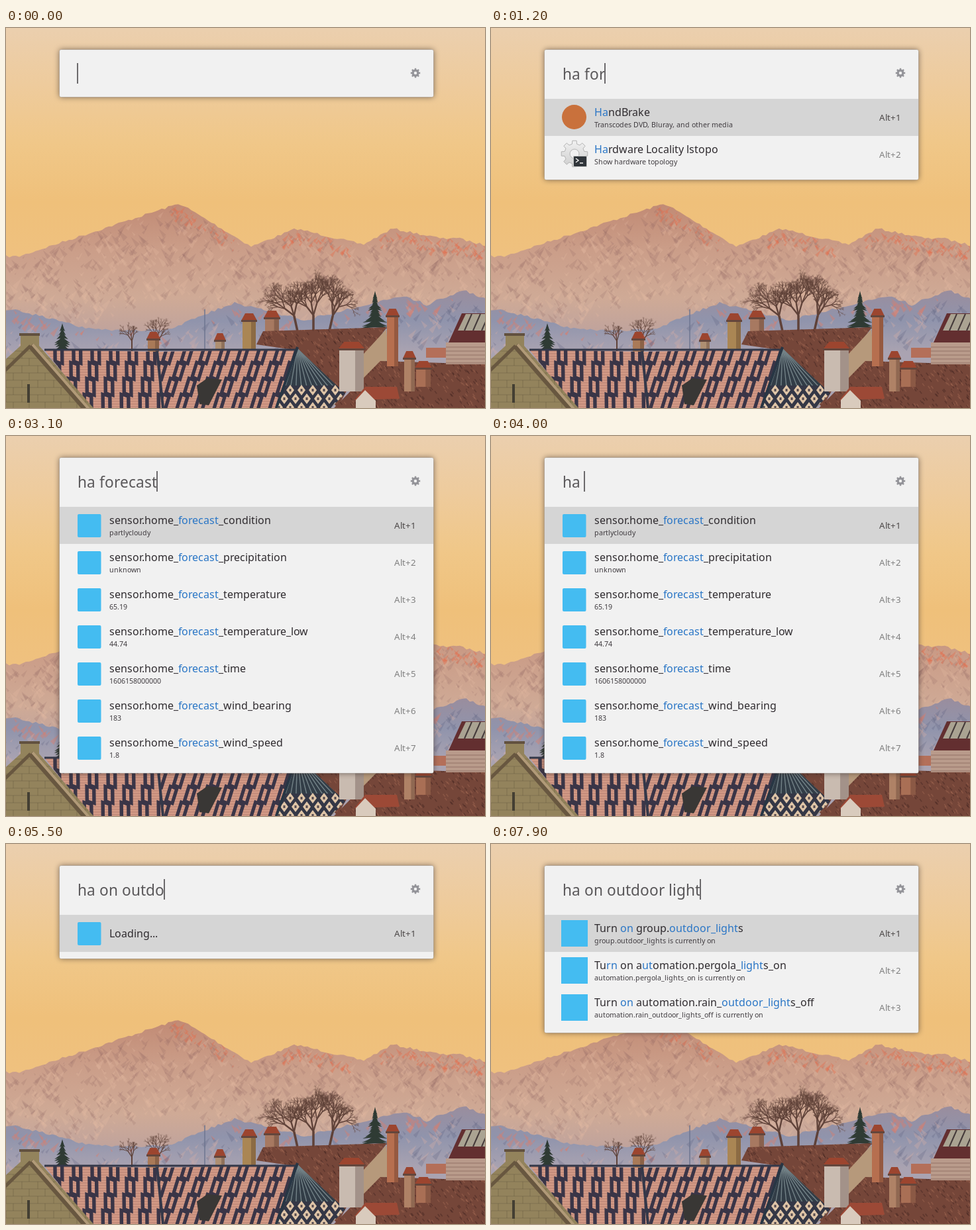
An HTML page with a canvas that plays this animation: 723x574 px, repeating every 8000 ms.

```html
<!DOCTYPE html>
<html lang="en">
<head>
<meta charset="utf-8">
<title>Launcher search</title>
<style>
html, body { margin: 0; width: 100%; height: 100%; overflow: hidden; background: #efc88f; }
canvas { display: block; width: 723px; height: 574px; }
</style>
</head>
<body>
<canvas id="stage" width="723" height="574"></canvas>
<script>
const W = 723, H = 574, LOOP = 8000;
const stage = document.getElementById('stage').getContext('2d', { alpha: false });

let seed = 7;
const rnd = () => (seed = (seed * 16807) % 2147483647) / 2147483647;
const between = (a, b) => a + (b - a) * rnd();

function gradient(c, y0, y1, ...colors) {
  const g = c.createLinearGradient(0, y0, 0, y1);
  colors.forEach((col, i) => g.addColorStop(i / (colors.length - 1), col));
  return g;
}

function poly(c, points, fill) {
  const path = new Path2D('M' + points + 'Z');
  c.fillStyle = fill;
  c.fill(path);
  return path;
}

function line(c, x0, y0, x1, y1, color, width = 1) {
  c.strokeStyle = color;
  c.lineWidth = width;
  c.beginPath();
  c.moveTo(x0, y0);
  c.lineTo(x1, y1);
  c.stroke();
}

function box(c, x, y, w, h, fill, r = 0) {
  c.fillStyle = fill;
  c.beginPath();
  c.roundRect(x, y, w, h, r);
  c.fill();
}

function inside(c, path, draw) {
  c.save();
  c.clip(path);
  draw();
  c.restore();
}

// ---- landscape ----

// Each peak: x, y, slope to the left, slope to the right
const ALPS = [[262, 265, .33, .6], [438, 303, .4, .24], [583, 303, .55, .2], [675, 316, .2, .25]];
const HILLS = [[10, 425, .3, .25], [345, 415, .4, .25], [600, 404, .25, .4], [690, 396, .4, .4]];

const skyline = (peaks, floor) => x => Math.min(floor,
  ...peaks.map(([px, py, left, right]) => py + (x < px ? (px - x) * left : (x - px) * right)));

function range(c, top, rough, fill) {
  let points = `0,${H}`;
  for (let x = 0; x < W + 5; x += 5) points += ` ${x},${top(x) + between(-rough, rough)}`;
  return poly(c, `${points} ${W},${H}`, fill);
}

function facet(c, x, y, size, color) {
  const dx = size * (rnd() < .5 ? -1 : 1);
  poly(c, `${x},${y} ${x + dx},${y + size * .8} ${x + dx * .6},${y + size * 1.2}`, color);
}

function mountains(c) {
  const top = skyline(ALPS, 345);
  const path = range(c, top, 1.8, gradient(c, 265, 480, '#c18a74', '#cb9e89', '#cfaa96', '#b9a09f'));
  inside(c, path, () => {
    for (let i = 0; i < 1300; i++) {
      const x = between(-10, W), depth = between(0, 130);
      const dark = rnd() < .72 - depth / 300;
      facet(c, x, top(x) + depth, between(2, 15), dark ? 'rgba(132,88,88,.17)' : 'rgba(228,186,162,.24)');
    }
    for (const [px] of ALPS)
      for (let i = 0; i < 45; i++) {
        const x = px + between(-15, 85);
        facet(c, x, top(x) + between(0, 20), between(2, 10), 'rgba(228,108,76,.4)');
      }
  });
}

function hills(c) {
  const top = skyline(HILLS, 456);
  const path = range(c, top, 2, gradient(c, 395, 490, '#9a8d9d', '#9094ac', '#aaa3b1'));
  inside(c, path, () => {
    for (let i = 0; i < 260; i++) {
      const x = between(0, W), depth = between(0, 60);
      const color = depth < 12 ? 'rgba(222,122,104,.4)'
        : rnd() < .5 ? 'rgba(88,93,124,.25)' : 'rgba(207,171,166,.36)';
      facet(c, x, top(x) + depth, between(4, 15), color);
    }
  });
}

function branch(c, x, y, angle, len, width) {
  const x1 = x + Math.cos(angle) * len, y1 = y + Math.sin(angle) * len;
  line(c, x, y, x1, y1, '#5f4239', width);
  if (len < 4) return;
  for (const turn of [-.5, 0, .5])
    branch(c, x1, y1, angle + turn + between(-.25, .25), len * between(.55, .82), width * .68);
}

function conifer(c, x, top, bottom, half) {
  for (let y = top; y < bottom; y += 3) {
    const w = half * (.15 + .85 * (y - top) / (bottom - top)) * between(.55, 1.15);
    poly(c, `${x},${y - 4} ${x + w},${y + 5} ${x},${y + 3} ${x - w},${y + 5}`, '#2f3b34');
  }
}

function chimney(c, x, y, w, bottom, wall) {
  box(c, x, y, w, bottom - y, wall);
  box(c, x + w * .65, y, w * .35, bottom - y, 'rgba(50,25,20,.25)');
  poly(c, `${x - 2},${y} ${x + w * .2},${y - 11} ${x + w * .8},${y - 11} ${x + w + 2},${y}`, '#9c452f');
  box(c, x - 2, y - 1, w + 4, 3, '#64463c');
}

// Columns of dark lozenges on pale tile courses
function tiles(c, points, skew) {
  inside(c, poly(c, points, '#d39a86'), () => {
    c.transform(1, 0, skew, 1, -skew * 486, 0);
    for (let y = 488; y < H; y += 4) line(c, -60, y, 500, y, 'rgba(110,62,62,.3)');
    c.strokeStyle = '#3a3547';
    c.lineWidth = 5;
    for (let row = 0; row < 5; row++)
      for (let x = 20; x < 460; x += 28) {
        const k = x + (row % 2) * 14, y = 494 + row * 24;
        c.stroke(new Path2D(`M${k - 9},${y + 9}L${k},${y - 13}L${k + 9},${y - 9}L${k},${y + 13}Z`));
      }
  });
}

function brownRoof(c, points) {
  const path = poly(c, points, '#754639');
  inside(c, path, () => {
    for (let i = 0; i < 900; i++) {
      const x = between(370, W), y = between(450, H);
      line(c, x, y, x + 3, y + 4, rnd() < .5 ? 'rgba(45,24,24,.32)' : 'rgba(184,122,98,.3)', 1.5);
    }
  });
}

function tent(c) {
  inside(c, poly(c, '440,484 408,574 490,574 512,552', '#323d47'), () => {
    for (let i = 0; i < 12; i++) line(c, 440, 484, 404 + i * 11, 562, '#738287', 1.4);
    box(c, 400, 540, 120, 40, '#343746');
    for (let row = 0; row < 3; row++)
      for (let x = 412; x < 510; x += 17) {
        const k = x + (row % 2) * 8, y = 547 + row * 13;
        poly(c, `${k},${y - 8} ${k + 6},${y} ${k},${y + 8} ${k - 6},${y}`, '#dfc5a7');
        box(c, k - 1.5, y - 2, 3, 4, '#554b50');
      }
  });
}

function gable(c) {
  inside(c, poly(c, '0,500 22,480 22,463 50,463 50,480 132,574 0,574', '#93835c'), () => {
    for (let y = 488; y < H; y += 11) {
      line(c, 0, y, 130, y, 'rgba(67,57,42,.25)');
      for (let x = (y % 2) * 11; x < 130; x += 24) line(c, x, y, x, y + 11, 'rgba(67,57,42,.25)');
    }
    line(c, 37, 480, 126, 582, '#685740', 9);
    line(c, 40, 478, 129, 580, '#b19a78', 4);
    line(c, 37, 480, -4, 520, '#685740', 5);
  });
  box(c, 20, 461, 31, 4, '#62513f');
  box(c, 32, 538, 4, 28, '#443f33');
}

function glasshouse(c) {
  box(c, 664, 475, 59, 33, '#b99b8b');
  for (let y = 482; y < 508; y += 6) line(c, 664, y, W, y, '#937266');
  poly(c, '668,475 688,431 723,431 723,475', '#632f30');
  poly(c, '682,457 694,432 723,432 723,457', '#aaa392');
  for (let x = 692; x < 735; x += 13) line(c, x, 457, x + 11, 432, '#443a3a', 2);
}

function town(c) {
  for (const x of [440, 464, 488]) branch(c, x, 458, -1.57 + (x - 464) / 110, 24, 3.5);
  for (const x of [190, 228]) branch(c, x, 488, -1.57, 15, 2);
  conifer(c, 557, 401, 452, 21);
  conifer(c, 85, 450, 488, 18);
  line(c, 300, 425, 300, 488, '#6e7690', 1.5);

  chimney(c, 391, 438, 21, 470, '#a77961');
  brownRoof(c, '388,458 575,452 545,492 500,574 440,487 378,478');
  chimney(c, 357, 442, 20, 486, '#aa8654');
  chimney(c, 316, 472, 14, 488, '#ae8f72');
  chimney(c, 214, 470, 17, 490, '#a97a58');
  poly(c, '540,492 574,455 578,500 535,535', '#b6997b');

  tiles(c, '58,486 227,489 236,574 128,574', .42);
  tiles(c, '229,489 440,485 408,574 238,574', .1);
  line(c, 58, 486, 440, 486, '#343849', 3);
  line(c, 228, 488, 237, H, '#343849', 4);
  poly(c, '288,540 304,529 326,531 306,570 292,568', '#393735');
  tent(c);
  line(c, 440, 482, 408, H, '#283644', 4);

  brownRoof(c, '495,574 565,503 723,508 723,574');
  chimney(c, 503, 485, 37, 549, '#c9bbb0');
  chimney(c, 575, 435, 17, 511, '#b66f4f');
  chimney(c, 601, 499, 16, 549, '#af8266');
  chimney(c, 619, 514, 22, 542, '#a96f55');
  poly(c, '526,562 542,542 590,542 594,560', '#9c4936');
  poly(c, '528,574 528,562 542,547 558,563 558,574', '#d9cbbd');
  box(c, 634, 483, 30, 15, '#b46f59');
  glasshouse(c);
  gable(c);
}

function landscape() {
  const canvas = document.createElement('canvas');
  canvas.width = W;
  canvas.height = H;
  const c = canvas.getContext('2d');
  c.fillStyle = gradient(c, 0, 350, '#ebcfae', '#eecb9c', '#f0c788', '#efc07a', '#efc17f');
  c.fillRect(0, 0, W, H);
  mountains(c);
  hills(c);
  town(c);
  return canvas;
}

// ---- launcher ----

const BLUE = '#2a76c6', SKY = '#44bcf1';

// Whole-pixel advances with kerning; asterisks toggle the highlight
function type(text, x, y, size, color) {
  const c = stage;
  c.font = `${size}px "Noto Sans", sans-serif`;
  const width = s => c.measureText(s).width;
  const chars = [...text.replaceAll('*', '')];
  let lit = false, i = 0;
  for (const ch of text) {
    if (ch === '*') { lit = !lit; continue; }
    c.fillStyle = lit ? BLUE : color;
    c.fillText(ch, x, y);
    const next = chars[++i] || '';
    x += Math.round(width(ch + next) - width(next) - .01);
  }
  return x;
}

function gear(x, y, r, hole, fill) {
  const path = new Path2D(), n = 8, step = Math.PI * 2 / n;
  for (let i = 0; i < n; i++)
    for (const [a, k] of [[-.3, .76], [-.2, 1], [.2, 1], [.3, .76]])
      path.lineTo(x + Math.cos((i + a) * step) * r * k, y + Math.sin((i + a) * step) * r * k);
  path.closePath();
  path.moveTo(x + hole, y);
  path.arc(x, y, hole, 0, 7);
  stage.fillStyle = fill;
  stage.fill(path, 'evenodd');
  return path;
}

const icons = {
  disc: y => box(stage, 107, y + 9, 37, 37, '#c9713c', 19),
  program(y) {
    const edge = gear(126, y + 27, 20, 7, gradient(stage, y + 8, y + 46, '#f0f0f0', '#cfcfcf'));
    stage.strokeStyle = '#b4b4b4';
    stage.lineWidth = 1;
    stage.stroke(edge);
    box(stage, 124, y + 30, 21, 17, '#c4c6c6', 1);
    box(stage, 125, y + 31, 19, 15, '#30353a', 1);
    stage.strokeStyle = '#f2f2f2';
    stage.lineWidth = 1.5;
    stage.stroke(new Path2D(`M128,${y + 34}l4,3l-4,3M134,${y + 41}h5`));
  },
  small: y => box(stage, 108, y + 11, 35.5, 35, SKY, 2),
  large: y => box(stage, 106, y + 8, 40, 40, SKY)
};

const apps = [
  ['disc', '*Ha*ndBrake', 'Transcodes DVD, Bluray, and other media'],
  ['program', '*Ha*rdware Locality lstopo', 'Show hardware topology']
];
const loading = [['small', 'Loading...']];
const forecast = Object.entries({
  condition: 'partlycloudy', precipitation: 'unknown', temperature: '65.19', temperature_low: '44.74',
  time: '1606158000000', wind_bearing: '183', wind_speed: '1.8'
}).map(([key, value]) => ['small', 'sensor.home_*forecast*_' + key, value]);
const lights = [
  'Turn *on* group.*outdoor_light*s',
  'Tu*rn* on a*ut*omation.pergola_*light*s_on',
  'Turn *on* automation.rain_*outdoor_light*s_off'
].map(title => ['large', title, title.replaceAll('*', '').slice(8) + ' is currently on']);

const scenes = [[0, []], [600, apps], [2300, loading], [3100, forecast], [4300, loading], [7000, lights]];
const CLEARED = 4000, KEY = 100;

// Bursts of typing, one key every KEY ms
const firstTry = [[600, 'ha f'], [1100, 'or'], [1400, 'e'], [1600, 'cas'], [2000, 't']];
const secondTry = [[CLEARED - 3 * KEY, 'ha '], [4600, 'on '], [5000, 'ou'], [5300, 't'], [5500, 'd'],
  [5500, 'o'], [5700, 'or l'], [6200, 'ight']];
const blinks = [[3300, 3700], [7700, 7900]];

const queryAt = t => (t < CLEARED ? firstTry : secondTry)
  .map(([from, keys]) => keys.slice(0, Math.max(0, Math.floor((t - from) / KEY) + 1))).join('');
const rowsAt = t => scenes.findLast(([from]) => from <= t)[1];
const caretOn = t => !blinks.some(([off, on]) => t >= off && t < on);

function panel(height) {
  stage.save();
  stage.shadowColor = 'rgba(50,40,35,.6)';
  stage.shadowBlur = 8;
  box(stage, 80.5, 32.5, 565, height + 1, '#b3b0ad', 3);
  stage.restore();
  box(stage, 81, 33, 564, height, '#f1f1f1', 2);
}

function row([icon, title, note], i) {
  const y = 107 + i * 56;
  if (!i) box(stage, 81, y, 564, 56, '#d5d5d5');
  icons[icon](y);
  type(title, 156, y + (note ? 26 : 34), 16, '#302c30');
  if (note) type(note, 156, y + 43, 32 / 3, '#403c40');
  type('Alt+' + (i + 1), 586, y + 33, 40 / 3, i ? '#808080' : '#4c4848');
}

const backdrop = landscape();

function draw(t) {
  const rows = rowsAt(t);
  stage.drawImage(backdrop, 0, 0);
  panel(rows.length ? 84 + rows.length * 56 : 71);
  gear(618, 68, 7.3, 2.3, '#949499');
  const end = type(queryAt(t), 108, 78, 68 / 3, '#5a585a');
  if (caretOn(t)) box(stage, end - 1, 53, 2, 31, '#6c6a6c');
  rows.forEach(row);
}

const start = performance.now();
function tick() {
  draw((performance.now() - start) % LOOP);
  requestAnimationFrame(tick);
}
tick();
</script>
</body>
</html>
```
